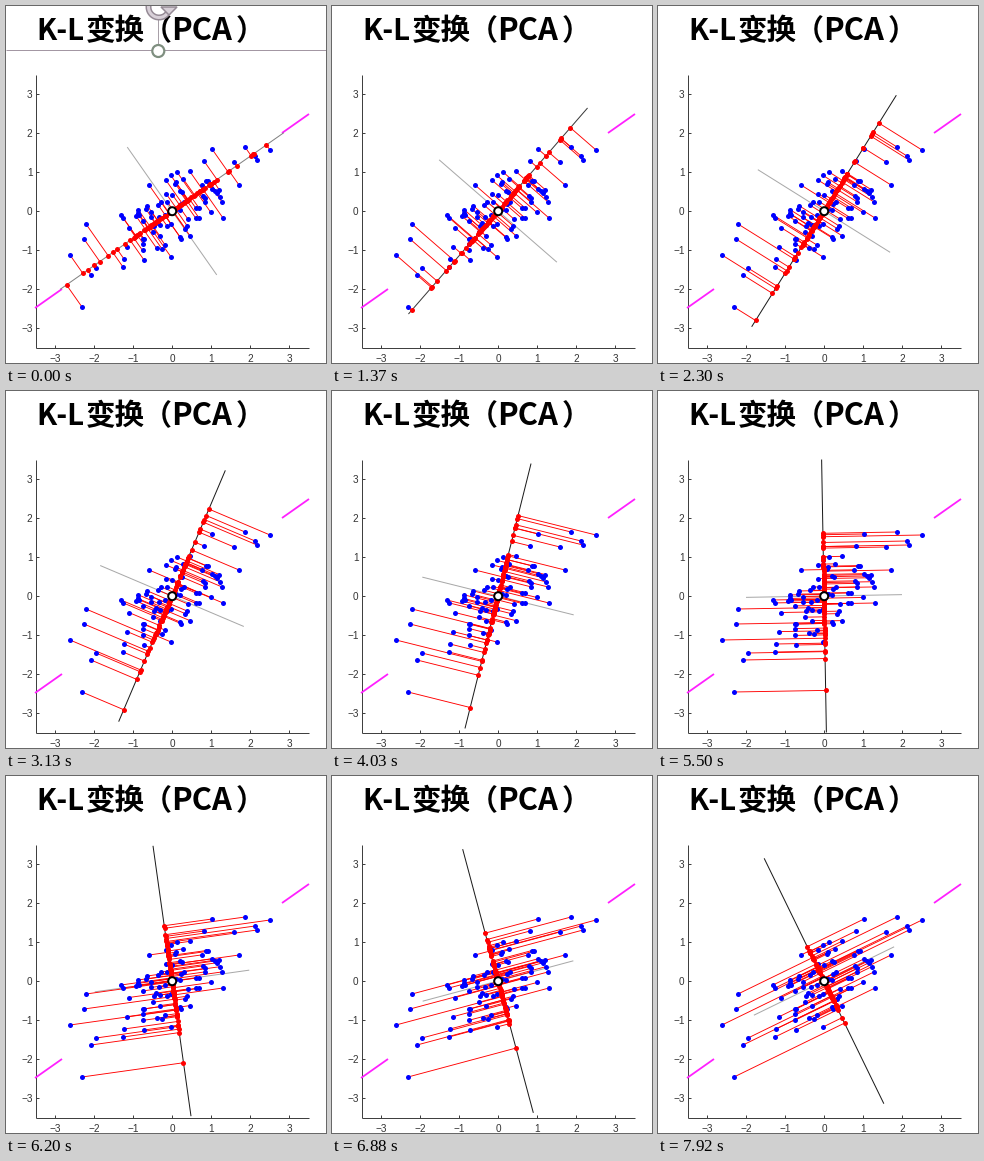
A matplotlib script for the animation above (8000 ms loop, 320 by 357 pixels).

```python
import numpy as np
import matplotlib.pyplot as plt
from matplotlib.animation import FuncAnimation
from matplotlib.collections import LineCollection
from matplotlib.patches import Arc, Circle, Polygon

W, H, DPI = 320, 357, 64
PX = 72 / DPI                      # one pixel in points
LOOP, TICK = 8000, 40
CX, CY, UNIT = 166, 205, 39        # plot origin and pixels per unit
CENTER = np.array([CX, CY])
START_ANGLE = 35
TURN_TIME = 97.6                   # ms for each one-degree turn
SELECTION_END = 750

# Outlying samples; the inner cloud is random
RIM = [(264, 144), (239, 141), (206, 143), (249, 150), (251, 154), (198, 155),
       (228, 156), (171, 166), (233, 179), (217, 212), (143, 179), (115, 209),
       (80, 218), (78, 233), (64, 249), (90, 262), (85, 269), (76, 301),
       (117, 261), (118, 253), (138, 254), (165, 251), (174, 231), (130, 210)]


def direction(deg):
    a = np.radians(deg)
    return np.array([np.cos(a), -np.sin(a)])


def make_points(count=68):
    """Rim samples plus an ellipse of random ones along the main axis."""
    rng = np.random.default_rng(7)
    radius = rng.random(count) ** 0.6
    turn = rng.uniform(0, 2 * np.pi, count)
    along, across = 62 * radius * np.cos(turn), 32 * radius * np.sin(turn)
    inner = (np.outer(along, direction(START_ANGLE))
             + np.outer(across, direction(START_ANGLE + 90)))
    return np.vstack([RIM, CENTER + inner])


points = make_points()

fig = plt.figure(figsize=(W / DPI, H / DPI), dpi=DPI, facecolor="white")
ax = fig.add_axes([0, 0, 1, 1])
ax.set(xlim=(0, W), ylim=(H, 0))
ax.axis("off")


def line(xs, ys, color, width=1, z=1):
    return ax.plot(xs, ys, color=color, lw=width * PX, zorder=z,
                   solid_capstyle="butt")[0]


def dots(color, z):
    return ax.plot([], [], "o", color=color, ms=5 * PX, mew=0, zorder=z)[0]


def label(x, y, value, align):
    ax.text(x, y, str(value).replace("-", "\u2212"), fontsize=10 * PX,
            color="#333333", family="Liberation Sans",
            ha=align, va="center_baseline")


def draw_axes():
    left, bottom, reach = 30, 342, 3.5 * UNIT
    ink = "#404040"
    line([left, left], [CY - reach, bottom], ink)
    line([left, CX + reach], [bottom, bottom], ink)
    for v in range(-3, 4):
        x, y = CX + v * UNIT, CY - v * UNIT
        line([x, x], [bottom - 3, bottom], ink)
        line([left, left + 3], [y, y], ink)
        label(x, 352, v, "center")
        label(26.5, y, v, "right")


def draw_title():
    for x, size, text in ((30.5, 29.5, "K-L"), (80, 29.5, "变换"),
                          (137, 29, "（"), (165.5, 31, "PCA"),
                          (230, 29, "）")):
        ax.text(x, 34.5, text, fontsize=size * PX, weight="bold",
                color="black", family="Noto Sans CJK JP", va="baseline",
                zorder=3)


def draw_selection():
    mauve, pale, green = "#958a95", "#d8d0d8", "#7f8f80"
    ring = dict(theta1=20, theta2=200)
    return [
        line([0, W], [44, 44], "#a397a3", 1, 4),
        line([152, 152], [12, 38], "#a8a0a8", 1, 4),
        ax.add_patch(Circle((152.3, 45), 6, fc="white", ec=green,
                            lw=2.2 * PX, zorder=5)),
        ax.add_patch(Arc((153, 1), 21, 21, color=mauve, lw=6 * PX,
                         zorder=5, **ring)),
        ax.add_patch(Arc((153, 1), 21, 21, color=pale, lw=3 * PX,
                         zorder=6, **ring)),
        ax.add_patch(Polygon([(155, 1), (171, 1), (163, 9)], fc=pale,
                             ec=mauve, lw=1.5 * PX, zorder=7)),
    ]


draw_axes()
draw_title()
selection = draw_selection()
for side in (-1, 1):
    line([CX + side * 110, CX + side * 137],
         [CY - side * 78, CY - side * 97], "#ff20ff", 1.8)

cross = line([], [], "#a8a8a8", 1, 2)
axis = line([], [], "black", 1, 3)
links = ax.add_collection(LineCollection([], colors="red",
                                         linewidths=0.9 * PX, zorder=4))
cloud = dots("blue", 5)
cloud.set_data(*points.T)
shadow = dots("red", 6)
ax.add_patch(Circle(CENTER + 0.2, 4, fc="white", ec="black",
                    lw=2 * PX, zorder=8))


def span(artist, unit, half):
    artist.set_data(*np.array([CENTER - half * unit, CENTER + half * unit]).T)


def update(i):
    t = i * TICK + 30
    turns = int(t / TURN_TIME)
    u = direction(START_ANGLE + turns)
    feet = CENTER + np.outer((points - CENTER) @ u, u)
    span(axis, u, 3.5 * UNIT)
    span(cross, direction(START_ANGLE + turns + 90), 2 * UNIT)
    axis.set_color(str(max(0.1, 0.5 - 0.02 * turns)))
    links.set_segments(np.stack([points, feet], axis=1))
    shadow.set_data(*feet.T)
    for part in selection:
        part.set_visible(t < SELECTION_END)
    return [axis, cross, links, shadow, *selection]


anim = FuncAnimation(fig, update, frames=LOOP // TICK, interval=TICK,
                     repeat=True, repeat_delay=0, blit=False)
plt.show()
```
